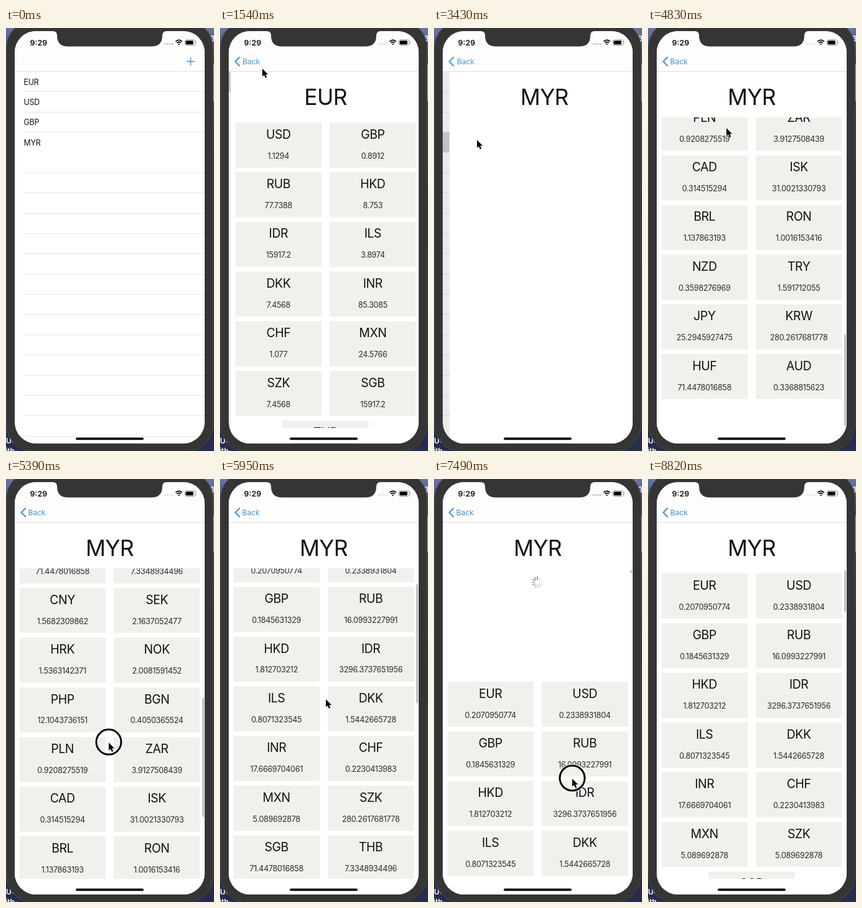
These frames come from a looping animation (334 by 676 pixels, 8.89 s). An HTML page:

```html
<!DOCTYPE html>
<html lang="en">
<head>
<meta charset="utf-8">
<title>Currency rates</title>
<style>
  html, body { margin: 0; width: 100%; height: 100%; overflow: hidden; background: #1f2748; }
  svg { display: block; width: 334px; height: 676px; }
  text { font-family: Inter, Roboto, sans-serif; fill: #111; }
  .mid { text-anchor: middle; }
  .title { font-size: 35.4px; letter-spacing: -.6px; }
  .code { font-size: 19.4px; letter-spacing: -.4px; }
  .rate { font-size: 12.5px; letter-spacing: -.28px; fill: #2a2a2a; }
  .row { font-size: 12.4px; letter-spacing: -.1px; }
  .back { font-size: 12.2px; letter-spacing: -.1px; fill: #4a92cf; }
  .clock { font-size: 12.4px; font-weight: 600; }
  .desk { font-size: 12px; font-weight: 600; fill: #fff; }
</style>
</head>
<body>
<svg id="stage" viewBox="0 0 334 676">
  <defs>
    <linearGradient id="sky" x1="0" y1="0" x2="0" y2="1">
      <stop offset="0" stop-color="#6b75a4"/>
      <stop offset=".08" stop-color="#39436f"/>
      <stop offset=".4" stop-color="#1d2340"/>
      <stop offset="1" stop-color="#262d4c"/>
    </linearGradient>
    <clipPath id="screen"><rect x="14" y="5" width="305" height="659" rx="34"/></clipPath>
    <clipPath id="grid"><rect x="14" y="143" width="305" height="496"/></clipPath>
  </defs>
  <rect width="334" height="676" fill="url(#sky)"/>
  <rect x="332" y="58" width="2" height="59" fill="#a9a9ad"/>
  <text class="desk" x="328" y="21">3</text>
  <text class="desk" x="0" y="664">U:</text>
  <text class="desk" x="-1" y="680">ith-</text>
  <rect x=".5" y="-12" width="332" height="689" rx="44" fill="#353535" stroke="#4b4b4d"/>
  <g clip-path="url(#screen)">
    <rect x="14" y="5" width="305" height="659" fill="#fff"/>
    <g id="list"></g>
    <rect id="dim" x="14" y="70" width="305" height="594"/>
    <g id="page">
      <rect x="14" y="70" width="305" height="594" fill="#fff"/>
      <text id="title" class="title mid" x="166.4" y="123"></text>
      <g id="spinner"></g>
    </g>
    <rect x="14" y="5" width="305" height="64.5" fill="#fdfdfd"/>
    <rect x="14" y="69" width="305" height="1" fill="#dedee0"/>
    <path id="plus" d="M290 53.5h13M296.5 47v13" stroke="#4a92cf" stroke-width="1.4"/>
    <g id="back">
      <path d="M31.8 46.3l-7.2 7.3 7.2 7.3" fill="none" stroke="#4a92cf" stroke-width="2.1"/>
      <text id="backText" class="back" x="35.6" y="58.1">Back</text>
    </g>
    <text class="clock" x="38.6" y="27.6">9:29</text>
    <g id="dots" fill="#c4c4c6"></g>
    <g fill="none" stroke="#111" stroke-width="1.9">
      <path d="M272.3 21.6q5.3-4.6 10.6 0M274.3 23.8q3.3-2.7 6.6 0"/>
      <path d="M277.6 27.4l-1.7-1.8q1.7-1.3 3.4 0z" fill="#111" stroke="none"/>
      <rect x="287.4" y="18.9" width="16.6" height="8.6" rx="2.3" stroke="#8d8d8d" stroke-width="1"/>
      <rect x="288.7" y="20.2" width="12.2" height="6" rx="1.2" fill="#000" stroke="none"/>
      <path d="M305 21.6q1.8 1.6 0 3.2z" fill="#8d8d8d" stroke="none"/>
    </g>
    <rect x="112" y="654.4" width="109" height="3.8" rx="1.9" fill="#000"/>
  </g>
  <path fill="#353535" d="M75 4v1q7 0 7 7c0 12 6 17.5 18 17.5h133c12 0 18-5.5 18-17.5q0-7 7-7v-1z"/>
  <g id="cursor">
    <g id="ring" fill="none">
      <circle r="20" stroke="#fff" stroke-width="5"/>
      <circle r="20" stroke="#000" stroke-width="3"/>
    </g>
    <path transform="translate(0 1) scale(.87)" d="M0 0v14.5l3.3-3.1 2.4 5.5 2.6-1.1-2.4-5.3h4.7z" fill="#000" stroke="#fff" stroke-width="1" paint-order="stroke"/>
  </g>
</svg>
<script>
const LOOP = 8890, STEP = 70, WIDTH = 305, PITCH = 79.4, TOP = 151, MAX = 783;
const $ = id => document.getElementById(id);

function add(parent, tag, attrs, text) {
  const el = document.createElementNS('http://www.w3.org/2000/svg', tag);
  for (const k in attrs) el.setAttribute(k, attrs[k]);
  if (text) el.textContent = text;
  return parent.appendChild(el);
}
const set = (el, k, v) => el.setAttribute(k, v);
const move = (el, x, y) => set(el, 'transform', `translate(${x} ${y})`);
const show = (el, on) => set(el, 'display', on ? 'inline' : 'none');
const clamp = v => Math.max(0, Math.min(1, v));
const within = (spans, t) => spans.some(([a, b]) => t >= a && t < b);

// Key: [time, values, ease]; no ease is smooth, n is ease-out of power n.
function track(keys, t) {
  const i = keys.findIndex(k => k[0] > t);
  if (i === 0) return keys[0][1];
  if (i < 0) return keys[keys.length - 1][1];
  const [t0, a] = keys[i - 1], [t1, b, n] = keys[i];
  const u = (t - t0) / (t1 - t0);
  const e = n ? 1 - (1 - u) ** n : u * u * (3 - 2 * u);
  return a.map((v, j) => v + (b[j] - v) * e);
}

const POINTER = [
  [70, [150, 690]], [700, [95, 79]], [840, [93, 76]], [1250, [93, 76]],
  [1540, [68, 64]], [1680, [45, 56]], [1950, [45, 56]], [2600, [69, 181]],
  [3430, [69, 178]], [3560, [69, 178]], [3950, [118, 430]], [4030, [119, 430]],
  [4300, [126, 170], 1], [4830, [126, 159]], [5130, [138, 170]], [5400, [166, 430], 1],
  [5600, [168, 430]], [5950, [170, 351]], [6450, [200, 215]], [6600, [200, 215]],
  [7400, [222, 478]], [7750, [222, 478]], [8540, [240, 695]]
];
const SCROLL = [
  [4030, [0]], [4300, [260], 1], [4830, [821], 2], [5130, [MAX]], [5400, [523], 1],
  [6300, [0], 2.33], [6600, [0]], [7100, [-75]], [7400, [-173]], [7560, [-173]],
  [7900, [-60], 3], [8050, [-60]], [8450, [0], 3]
];
const PRESSES = [[950, 1060], [1690, 1790], [2880, 2990], [4030, 4300], [5130, 5400], [6600, 7630]];
const PUSH_EUR = 1012, POP = 1800, PUSH_MYR = 3018, RELOAD = 8050;

const EUR = `USD 1.1294 GBP 0.8912 RUB 77.7388 HKD 8.753 IDR 15917.2 ILS 3.8974 DKK 7.4568
  INR 85.3085 CHF 1.077 MXN 24.5766 SZK 7.4568 SGB 15917.2 THB 35.419`;
const MYR = `EUR 0.2070950774 USD 0.2338931804 GBP 0.1845631329 RUB 16.0993227991
  HKD 1.812703212 IDR 3296.3737651956 ILS 0.8071323545 DKK 1.5442665728
  INR 17.6669704061 CHF 0.2230413983 MXN 5.089692878 SZK 280.2617681778
  SGB 71.4478016858 THB 7.3348934496 CNY 1.5682309862 SEK 2.1637052477
  HRK 1.5363142371 NOK 2.0081591452 PHP 12.1043736151 BGN 0.4050365524
  PLN 0.9208275519 ZAR 3.9127508439 CAD 0.314515294 ISK 31.0021330793
  BRL 1.137863193 RON 1.0016153416 NZD 0.3598276969 TRY 1.591712055
  JPY 25.2945927475 KRW 280.2617681778 HUF 71.4478016858 AUD 0.3368815623`;

function buildGrid(data) {
  const view = add($('page'), 'g', { 'clip-path': 'url(#grid)' });
  const body = add(view, 'g', {});
  const words = data.trim().split(/\s+/), cards = [];
  for (let i = 0; i < words.length / 2; i++) {
    const g = add(body, 'g', {});
    add(g, 'rect', { width: 138.5, height: 72, fill: '#f0f1ec' });
    add(g, 'text', { class: 'code mid', x: 69.2, y: 25.7 }, words[2 * i]);
    const rate = add(g, 'text', { class: 'rate mid', x: 69.2, y: 57.5 }, words[2 * i + 1]);
    cards.push({ g, rate, value: words[2 * i + 1] });
  }
  return { view, body, cards };
}

// Before a layout pass the seventh row holds one centred card.
function placeCards({ cards }, single) {
  cards.forEach(({ g }, i) => {
    const alone = single && i === 12;
    move(g, alone ? 97.2 : i % 2 ? 173 : 21.5, TOP + (i >> 1) * PITCH);
    show(g, !single || i <= 12);
  });
}

const rowY = i => 69.5 + i * 32.37;
const mark = add($('list'), 'rect', { x: 14, width: WIDTH + 100, height: 32.4, fill: '#d3d3d3' });
for (let i = 1; i <= 18; i++)
  if (i !== 4) add($('list'), 'rect', { x: 28.5, y: Math.floor(rowY(i)), width: 291, height: 1, fill: '#e6e6e8' });
['EUR', 'USD', 'GBP', 'MYR'].forEach((code, i) =>
  add($('list'), 'text', { class: 'row', x: 28.4, y: rowY(i) + 21 }, code));

for (let i = 0; i < 4; i++) add($('dots'), 'circle', { cx: 255.6 + 4 * i, cy: 25.6, r: 1.5 });

const spokes = Array.from({ length: 12 }, (_, i) => add($('spinner'), 'path', {
  d: 'M0-4.6V-9', stroke: '#777', 'stroke-width': 1.5, 'stroke-linecap': 'round', transform: `rotate(${i * 30})`
}));

const eur = buildGrid(EUR), myr = buildGrid(MYR);
placeCards(eur, true);
const bar = add($('page'), 'rect', { x: 315.3, width: 2.5, rx: 1.25, fill: '#b3b3b5' });

// Share of a slide still to go.
function left(t, start) {
  const u = Math.max(0, t - start) * .0125;
  return u > 9 ? 0 : (1 + u) * Math.exp(-u);
}

function drawPages(t) {
  const second = t >= 2700;
  const away = second ? left(t, PUSH_MYR) : t < POP ? left(t, PUSH_EUR) : 1 - left(t, POP);
  const on = 1 - away;
  move($('page'), away * WIDTH, 0);
  move($('list'), -.3 * WIDTH * on, 0);
  set($('dim'), 'opacity', .08 * on);
  set($('plus'), 'opacity', clamp(1 - on * 1.5));
  set($('back'), 'opacity', clamp(on * 1.5 - .5));
  move($('backText'), away * 35, 0);
  $('title').textContent = second ? 'MYR' : 'EUR';

  const picked = within([[950, POP], [2880, LOOP]], t);
  const fading = within([[POP, 2700]], t);
  set(mark, 'y', rowY(second ? 3 : 0));
  set(mark, 'opacity', picked ? 1 : fading ? on : 0);

  show(eur.view, !second && t >= 1400);
  show(myr.view, t >= 3600);
}

function drawScroll(t) {
  const [y] = track(SCROLL, t);
  const single = t < 4050 || t >= RELOAD;
  move(myr.body, 0, -y);
  placeCards(myr, single);

  // Two codes have no rate and keep the text of a reused card.
  const early = t < 4500, fresh = t >= RELOAD;
  const { cards } = myr;
  cards[11].rate.textContent = cards[early ? 7 : fresh ? 10 : 11].value;
  cards[12].rate.textContent = cards[early ? 5 : 12].value;

  const over = Math.max(0, -y, y - MAX);
  const size = Math.max(4, (single ? 66 : 190) - 1.15 * over);
  set(bar, 'height', size);
  set(bar, 'y', y > MAX ? 636 - size : 146 + clamp(y / MAX) * (490 - size));
  show(bar, within([[4050, 6440], [6650, LOOP]], t));

  const pull = Math.max(0, -y), spinning = t >= 7200;
  const head = Math.floor((t - 7490) / 83.3);
  move($('spinner'), 166, 143 + Math.min(22, pull / 2));
  show($('spinner'), pull > 8);
  set($('spinner'), 'opacity', t > RELOAD ? clamp(pull / 60) : 1);
  spokes.forEach((s, i) => {
    const age = (((head - i) % 12) + 12) % 12;
    set(s, 'opacity', spinning ? Math.max(.15, .95 - age * .085) : i < pull / 100 * 12 ? .6 : 0);
  });
}

function drawPointer(t) {
  const [x, y] = track(POINTER, t);
  move($('cursor'), x, y);
  show($('cursor'), t >= 70 && t < 8610);
  show($('ring'), within(PRESSES, t));
}

function frame(now) {
  const t = Math.floor((now % LOOP) / STEP) * STEP;
  drawPages(t);
  drawScroll(t);
  drawPointer(t);
  set($('dots'), 'opacity', within([[1000, 1900], [3700, 7200], [8200, LOOP]], t) ? .45 : 1);
}

const start = performance.now();
function tick() {
  frame(performance.now() - start);
  requestAnimationFrame(tick);
}
tick();
</script>
</body>
</html>
```
